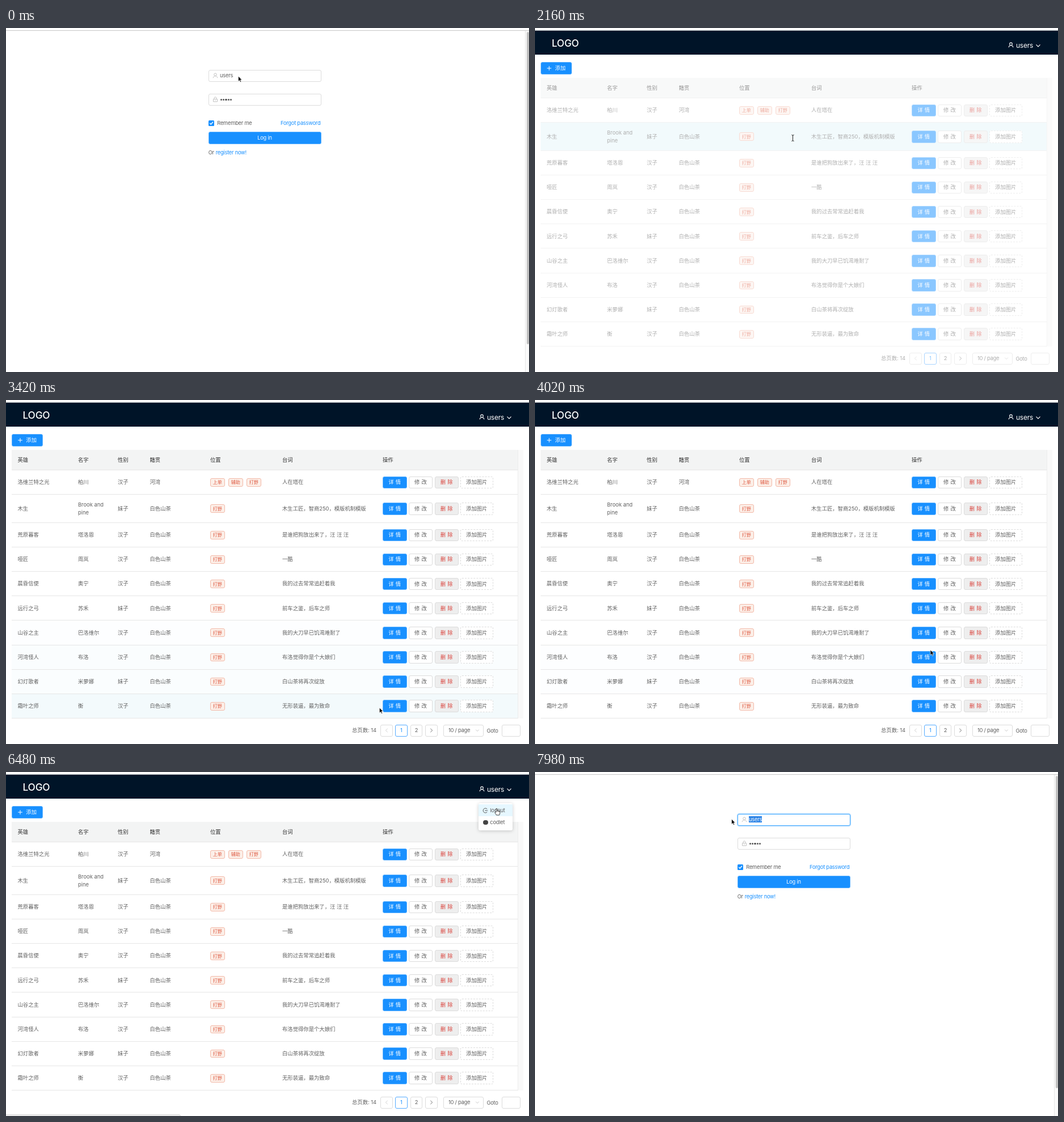
Recreate the animation shown at these times as an HTML page. Size 922 px wide and 607 px high, loop 8000 ms.

```html
<!DOCTYPE html>
<html lang="zh">
<head>
<meta charset="utf-8">
<style>
html, body { margin: 0; width: 100%; height: 100%; overflow: hidden; background: #fff; }
body { position: relative; font: 9.33px/14px Inter, "Noto Sans CJK SC", "Noto Sans CJK", sans-serif; color: #606060; }
div, svg { position: absolute; box-sizing: border-box; white-space: pre; }
svg { overflow: visible; fill: none; stroke: currentColor; }
.page { inset: 0; }
.la { letter-spacing: -.25px; }
.link { color: #1890ff; }
.btn { display: flex; align-items: center; justify-content: center; background: #fff; border: 1px solid #dcdcdc; border-radius: 3px; }
.primary { background: #1890ff; border-color: #5fb2ff; color: #fff; }
.gap { letter-spacing: 3.2px; padding-left: 3px; }
.danger { background: #eee; color: #d9433c; }
.dashed { border-style: dashed; }
.on { border-color: #55abff; color: #1890ff; }
.tag { font-size: 8px; background: #fcefe8; border-color: #f3b9a8; color: #de5a42; }
.focus { border-color: #40a9ff; box-shadow: 0 0 0 1.3px rgba(24,144,255,.28); }
.head { color: #333; font-weight: 500; }
mark { background: #2b83e6; color: #fff; }
</style>
</head>
<body>
<script>
const box = (x, y, w, h, cls = '', html = '', css = '', id = '') =>
  `<div id="${id}" class="${cls}" style="left:${x}px;top:${y}px;width:${w}px;height:${h}px;${css}">${html}</div>`;
const text = (x, cy, s, cls = '', css = '', id = '') =>
  `<div id="${id}" class="${cls}" style="left:${x}px;top:${cy - 7}px;${css}">${s}</div>`;
const icon = (x, y, d, color, scale = 1, width = 1) =>
  `<svg width="1" height="1" style="left:${x}px;top:${y}px;color:${color}"><path d="${d}" transform="scale(${scale})" stroke-width="${width}"/></svg>`;

const USER = 'users';
const person = 'M-2.3 -1.8a2.3 2.3 0 1 0 4.6 0a2.3 2.3 0 1 0 -4.6 0M-3.8 4.2C-3.6 -.4 3.6 -.4 3.8 4.2';
const lock = 'M-3.5 -.4h7v4.4h-7zM-2 -.4v-1.8a2 2 0 0 1 4 0v1.8M0 1.3v1.3';
const down = 'M-3.5 -1.7L0 1.8L3.5 -1.7';

// Login page
const dots = [0, 1, 2, 3, 4].map(i => box(377.8 + 4.25 * i, 124.6, 3.3, 3.3, '', '', 'border-radius:50%;background:#555')).join('');
const login = box(0, 4, 922, 1, '', '', 'background:#c6c6c6') +
  box(915, 5, 7, 602, '', '', 'background:#fafafa;border-left:1px solid #e6e6e6') +
  box(917.5, 7, 4.5, 551, '', '', 'background:#c1c1c1;border-radius:3px') +
  box(356.5, 73.5, 199, 21.5, 'btn', '', '', 'nameBox') +
  box(356.5, 115.5, 199, 21.5, 'btn', '', '', 'passBox') +
  icon(369.3, 84, person, '#bbb', 1, .9) + icon(369.3, 126, lock, '#bbb', 1, .9) +
  text(377, 84.3, '', 'la', '', 'nameText') + dots +
  box(398, 120, 1, 12, '', '', 'background:#333', 'caret') +
  box(356.7, 162.7, 10.7, 10.7, 'primary', '', 'border-radius:1.5px') +
  icon(362, 168, 'M-2.8 -.1L-.7 2L2.9 -2.2', '#fff', 1, 1.4) +
  text(372.3, 168, 'Remember me', 'la') +
  text(484, 168, 'Forgot password', 'la link') +
  box(356.5, 183, 199, 21.5, 'btn primary la', 'Log in') +
  text(356.7, 219.7, 'Or', 'la') + text(369.7, 219.7, 'register now!', 'la link');

// Table page
const cols = [20.5, 127, 197, 253.5, 360, 487, 664];
const M = '汉子', F = '妹子', TEA = '白色山茶';
const rows = [
  ['洛维兰特之光', '柏川', M, '河湾', '人在塔在'],
  ['木生', 'Brook and\npine', F, TEA, '木生工匠，智商250，模版机制模版'],
  ['荒原暮客', '塔洛恩', M, TEA, '是谁把狗放出来了，汪 汪 汪'],
  ['哑匠', '周岚', M, TEA, '一酷'],
  ['晨昏信使', '奥宁', M, TEA, '我的过去常常追赶着我'],
  ['远行之弓', '苏禾', F, TEA, '前车之鉴，后车之师'],
  ['山谷之主', '巴洛维尔', M, TEA, '我的大刀早已饥渴难耐了'],
  ['河湾怪人', '布洛', M, TEA, '布洛觉得你是个大娘们'],
  ['幻灯歌者', '米萝娜', F, TEA, '白山茶将再次绽放'],
  ['霜叶之师', '衡', M, TEA, '无形装逼，最为致命']
];
const rowTop = i => 124 + 43.13 * i + (i > 1 ? 6.7 : 0);
const rowHtml = (r, i) => {
  const top = rowTop(i), h = rowTop(i + 1) - top, c = top + h / 2 - .3;
  const tags = i ? ['打野'] : ['上单', '辅助', '打野'];
  const button = (x, w, s, cls) => box(x, c - 10.7, w, 21.5, 'btn ' + cls, s);
  return box(10, top, 892, h, '', '', 'border-bottom:1px solid #e6e6e6', 'row' + i) +
    r.slice(0, 4).map((s, k) => text(cols[k], c - (s.includes('\n') ? 7 : 0), s)).join('') +
    tags.map((s, k) => box(359.5 + 32 * k, c - 7.3, 26.5, 14.7, 'btn tag', s)).join('') +
    text(cols[5], c, r[4]) +
    button(664, 42.5, '详情', 'primary gap') + button(710, 42, '修改', 'gap') +
    button(755.5, 42.5, '删除', 'danger gap') + button(800.5, 58.5, '添加图片', 'dashed');
};
const pager = (x, w, s, cls = '') => box(x, 572.5, w, 21.5, 'btn la ' + cls, s);
const table = box(10, 88, 892, 36, '', '', 'background:#f3f4f4;border-bottom:1px solid #e6e6e6') +
  box(902, 88, 10, 474, '', '', 'background:#f9f9f9;border-left:1px solid #ececec') +
  ['英雄', '名字', '性别', '籍贯', '位置', '台词', '操作'].map((s, k) => text(cols[k], 106, s, 'head')).join('') +
  rows.map(rowHtml).join('') +
  text(610, 583, '总页数: 14') +
  pager(660, 21.5, '') + icon(671, 583.3, 'M1.7 -3.2L-1.7 0L1.7 3.2', '#ccc', 1, .9) +
  pager(686, 21.5, '1', 'on') + pager(712.7, 21.5, '2') +
  pager(739, 21.5, '') + icon(749.5, 583.3, 'M-1.7 -3.2L1.7 0L-1.7 3.2', '#666', 1, .9) +
  pager(771, 71, '') + text(780, 583.2, '10 / page', 'la') + icon(830.5, 583.3, down, '#bbb', .8) +
  text(847.5, 583.5, 'Goto', 'la') + pager(873.5, 33.5, '');
const menu = box(0, 2.7, 59.5, 21.3, '', '', 'background:#e6f7ff', 'hover') +
  icon(12.3, 13.2, 'M3.2 -2.6A4 4 0 1 0 3.2 2.6M-.8 0h5', '#555') +
  text(20.3, 13.2, 'logout', 'la') +
  box(8.3, 30.2, 8.6, 8.6, '', '', 'border-radius:50%;background:#444') +
  text(20.3, 34.5, 'codlet', 'la');
const home = box(0, 4, 922, 43, '', '', 'background:#001428;border-top:1px solid #8f969d') +
  text(29.5, 26.5, 'LOGO', '', 'font-size:17.3px;font-weight:500;letter-spacing:-.2px;color:#fff') +
  icon(839, 30, person, '#fff', 1, 1.1) +
  text(848, 30.5, USER, 'la', 'font-size:12px;color:#fff') + icon(886.7, 30.5, down, '#fff', 1, 1.2) +
  box(10, 60, 54.5, 21.7, 'btn primary') + icon(25.2, 71, 'M-3.8 0h7.6M0 -3.8v7.6', '#fff') +
  text(35.3, 71, '添加', '', 'color:#fff') +
  box(0, 0, 922, 607, '', table, '', 'table') +
  box(833, 54.5, 59.5, 48, '', menu, 'background:#fff;border-radius:3px;box-shadow:0 1px 6px rgba(0,0,0,.2);transform-origin:0 0', 'menu') +
  box(-2, 604, 310, 5, '', '', 'background:#ececec;border:1px solid #dcdcdc;border-radius:0 3px 0 0', 'status');

// Pointers, hot spot at 0,0
const pointers = {
  arrow: '<path d="M0 0V9.3L2.2 7.3L3.7 10.6L5.2 9.9L3.8 6.7H6.6Z" fill="#000" stroke="#fff" stroke-width=".7"/>',
  beam: '<path d="M-2 0Q0 0 0 1.5Q0 0 2 0M0 1V10M-2 11Q0 11 0 9.5Q0 11 2 11" stroke="#222"/>',
  hand: '<path d="M-1 7V1Q0 -.6 1 1V4Q2 3.2 2.9 4.4Q4 3.8 4.6 5Q6 4.7 6 6.2Q6 9 4.7 12H-.5Q-1.4 9.8 -3.3 7.7Q-3.5 6 -1 7ZM1 4V6M2.9 4.4V6.3M4.6 5V6.6" fill="#fff" stroke="#222" stroke-width=".85"/>'
};
document.body.innerHTML = box(0, 0, 922, 607, 'page', login, '', 'login') +
  box(0, 0, 922, 607, 'page', home, '', 'home') +
  Object.entries(pointers).map(([k, p]) => `<svg id="${k}" width="1" height="1">${p}</svg>`).join('');

// time, x, y, pointer from then on
const path = [
  [0, 409.5, 85, 'arrow'], [240, 407, 105, 'beam'], [420, 405, 121, 'beam'], [700, 405, 121, 'beam'],
  [840, 405, 183, 'hand'], [1200, 405.5, 215, 'hand'], [1440, 405.5, 215, 'hand'], [1620, 430, 190, 'hand'],
  [1740, 432, 190, 'arrow'], [2100, 450, 189, 'beam'], [2520, 531.5, 182, 'beam'], [2640, 531.5, 182, 'beam'],
  [3000, 570, 300, 'beam'], [3300, 640, 520, 'arrow'], [3600, 692, 585, 'arrow'], [3960, 700, 578, 'arrow'],
  [4020, 697, 441, 'arrow'], [4400, 740, 300, 'arrow'], [4750, 830, 120, 'arrow'], [4980, 858, 34, 'hand'],
  [5160, 858, 40, 'hand'], [5340, 858, 74, 'hand'], [5900, 860, 72, 'hand'], [6480, 865, 64, 'hand'],
  [6600, 865, 64, 'arrow'], [6720, 520, 90, 'arrow'], [6960, 407, 80, 'beam'], [7140, 405, 79, 'beam'],
  [7380, 362, 82, 'arrow'], [7560, 346.5, 83, 'arrow'], [8000, 346.5, 83, 'arrow']
];
const $ = id => document.getElementById(id);
const clamp = (v, a = 0, b = 1) => Math.min(b, Math.max(a, v));
const show = (id, on) => $(id).style.visibility = on ? 'visible' : 'hidden';

function pointerAt(t) {
  const i = path.findLastIndex(p => p[0] <= t), a = path[i], b = path[i + 1];
  const u = (t - a[0]) / (b[0] - a[0]), e = u * u * (3 - 2 * u);
  return { x: a[1] + (b[1] - a[1]) * e, y: a[2] + (b[2] - a[2]) * e, kind: a[3] };
}

function draw(t) {
  const p = pointerAt(t), inside = t >= 1740 && t < 6600;
  $('login').style.display = inside ? 'none' : '';
  $('home').style.display = inside ? '' : 'none';
  for (const k in pointers) show(k, k === p.kind);
  $(p.kind).style.transform = `translate(${p.x}px,${p.y}px)`;

  if (inside) {
    $('table').style.opacity = .5 + .5 * clamp((t - 2310) / 330);
    // Row highlight eases over the last 300 ms of pointer positions
    const recent = Array.from({ length: 10 }, (_, k) => pointerAt(Math.max(1740, t - 30 * k)).y);
    rows.forEach((_, i) => {
      const n = recent.filter(y => y >= rowTop(i) && y < rowTop(i + 1)).length;
      $('row' + i).style.background = `rgba(231,246,250,${n / 10})`;
    });
    const open = clamp((t - 5040) / 200);
    $('menu').style.opacity = open;
    $('menu').style.transform = `scaleY(${.8 + .2 * open})`;
    $('hover').style.opacity = clamp((t - 5200) / 120);
    $('status').style.opacity = clamp((t - 5220) / 120);
  } else {
    const late = t >= 7080, pass = t >= 480 && t < 1740;
    $('nameBox').classList.toggle('focus', late);
    $('passBox').classList.toggle('focus', pass);
    $('caret').style.opacity = pass ? 1 : 0;
    const n = late && t > 7140 ? Math.round(clamp((401 - p.x) / 24) * 5) : 0;
    const cut = USER.length - n;
    $('nameText').innerHTML = USER.slice(0, cut) + (n ? `<mark>${USER.slice(cut)}</mark>` : '');
  }
}

function tick() {
  const t = performance.now() % 8000;
  draw(t - t % 60);
  requestAnimationFrame(tick);
}
tick();
</script>
</body>
</html>
```
